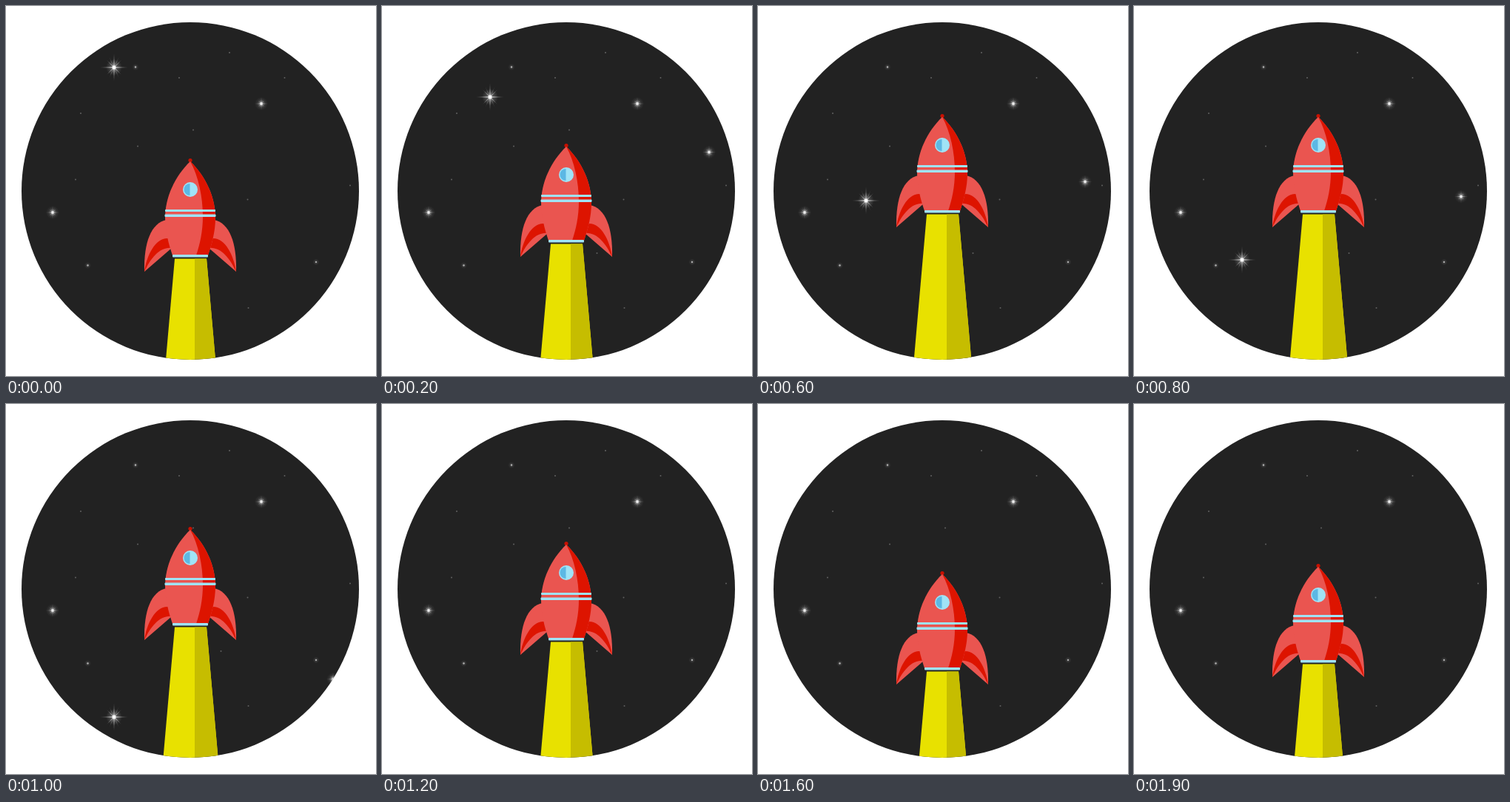
Write an HTML page without scripts that moves like this. It is 500 by 500 pixels and loops after 2 s.

```html
<!DOCTYPE html>
<html lang="en">
<head>
<meta charset="utf-8">
<title>Rocket</title>
<style>
  html, body { margin: 0; width: 100%; height: 100%; overflow: hidden; background: #fff; }
  svg { display: block; width: 100%; height: 100%; }

  .rocket { animation: hover 2s infinite; }
  .comet  { animation: fall 2s infinite; }
  .drift  { animation: sink 2s infinite; }

  /* every move is stepped at ten poses per second */
  @keyframes hover {
    0%   { transform: translateY(0);     animation-timing-function: steps(7); }
    35%  { transform: translateY(-70px); animation-timing-function: steps(10); }
    85%  { transform: translateY(30px);  animation-timing-function: steps(3); }
    100% { transform: translateY(0); }
  }
  @keyframes fall {
    0%   { transform: translateY(83px);  animation-timing-function: steps(3); }
    15%  { transform: translateY(143px); animation-timing-function: steps(9); }
    60%, 100% { transform: translateY(503px); }
  }
  @keyframes sink {
    0%   { transform: translateY(600px); animation-timing-function: step-end; }
    5%   { transform: translateY(187px); animation-timing-function: steps(7); }
    40%  { transform: translateY(257px); animation-timing-function: steps(6); }
    70%, 100% { transform: translateY(600px); animation-timing-function: step-end; }
  }

  .light { fill: #ea5550; }
  .dark  { fill: #dd1400; }
  .trim  { fill: #a0e3f6; }
</style>
</head>
<body>
<svg viewBox="0 0 500 500">
  <defs>
    <clipPath id="disc"><circle cx="249" cy="250" r="228"/></clipPath>

    <radialGradient id="glow">
      <stop offset="0" stop-color="#fff"/>
      <stop offset=".16" stop-color="#fff" stop-opacity=".8"/>
      <stop offset=".32" stop-color="#fff" stop-opacity=".22"/>
      <stop offset="1" stop-color="#fff" stop-opacity="0"/>
    </radialGradient>
    <radialGradient id="fade" gradientUnits="userSpaceOnUse" cx="0" cy="0" r="20">
      <stop offset="0" stop-color="#fff" stop-opacity=".65"/>
      <stop offset="1" stop-color="#fff" stop-opacity=".12"/>
    </radialGradient>

    <path id="ray" d="M-19 0L0-.9 19 0 0 .9Z" fill="url(#fade)"/>
    <g id="star">
      <use href="#ray"/>
      <use href="#ray" transform="rotate(90)"/>
      <use href="#ray" transform="rotate(45) scale(.75)"/>
      <use href="#ray" transform="rotate(-45) scale(.75)"/>
      <use href="#ray" transform="rotate(65) scale(.85)" opacity=".5"/>
      <use href="#ray" transform="rotate(-65) scale(.85)" opacity=".5"/>
      <circle r="11" fill="url(#glow)"/>
      <circle r="2" fill="#fff"/>
    </g>
    <g id="mid">
      <use href="#star" transform="scale(.5)"/>
      <circle r="9" fill="url(#glow)" opacity=".55"/>
      <circle r="1.4" fill="#eee"/>
    </g>
    <g id="small">
      <circle r="4.5" fill="url(#glow)" opacity=".5"/>
      <circle r="1.2" fill="#aaa"/>
    </g>
    <circle id="dot" r="1" fill="#606060"/>

    <g id="fin">
      <path class="light" d="M217 289C196 293 186 320 187 359L224 327Z"/>
      <path class="dark" d="M187 359C190 337 202 313 219 314L225 327C208 325 196 340 187 359Z"/>
    </g>
  </defs>

  <g clip-path="url(#disc)">
    <rect width="500" height="500" fill="#222"/>

    <use href="#dot" x="302" y="63"/>
    <use href="#dot" x="234" y="97"/>
    <use href="#dot" x="376.5" y="97"/>
    <use href="#dot" x="101" y="145"/>
    <use href="#dot" x="253" y="167.5"/>
    <use href="#dot" x="178" y="189.5"/>
    <use href="#dot" x="94" y="234.5"/>
    <use href="#dot" x="326.5" y="261.5"/>
    <use href="#dot" x="465" y="242.5"/>
    <use href="#dot" x="290.5" y="334"/>
    <use href="#dot" x="327.5" y="408"/>
    <use href="#small" x="175" y="82.5"/>
    <use href="#small" x="110.5" y="350.5"/>
    <use href="#small" x="419" y="346"/>
    <use href="#mid" x="345" y="132"/>
    <use href="#mid" x="63" y="279"/>

    <g class="comet"><use href="#star" x="146"/></g>
    <g class="drift"><use href="#mid" x="442" y=".5"/></g>

    <g class="rocket">
      <path fill="#e8e100" d="M228 341.5H271L289 546H210Z"/>
      <path fill="#c6bd00" d="M255 341.5H271L289 546H255Z"/>

      <use href="#fin"/>
      <use href="#fin" transform="matrix(-1 0 0 1 498 0)"/>

      <circle cx="249" cy="208.5" r="2.6" fill="#c81000"/>
      <path class="light" d="M249 210C228 230 215 259 215 286C215 305 220 322 225 337H273C278 322 283 305 283 286C283 259 270 230 249 210Z"/>
      <path class="dark" d="M249 210C260 230 266 258 266 284C266 305 262 322 257 337H273C278 322 283 305 283 286C283 259 270 230 249 210Z"/>

      <rect class="trim" x="215" y="275" width="68" height="3" rx="1"/>
      <rect class="trim" x="214.5" y="281.5" width="69" height="3.5" rx="1"/>
      <rect class="trim" x="225" y="336" width="48" height="3.5" rx="1"/>

      <circle class="trim" cx="249" cy="248" r="10"/>
      <path fill="#5cb8e4" d="M248.5 240A8 8 0 0 0 248.5 256Z"/>
    </g>
  </g>
</svg>
</body>
</html>
```
